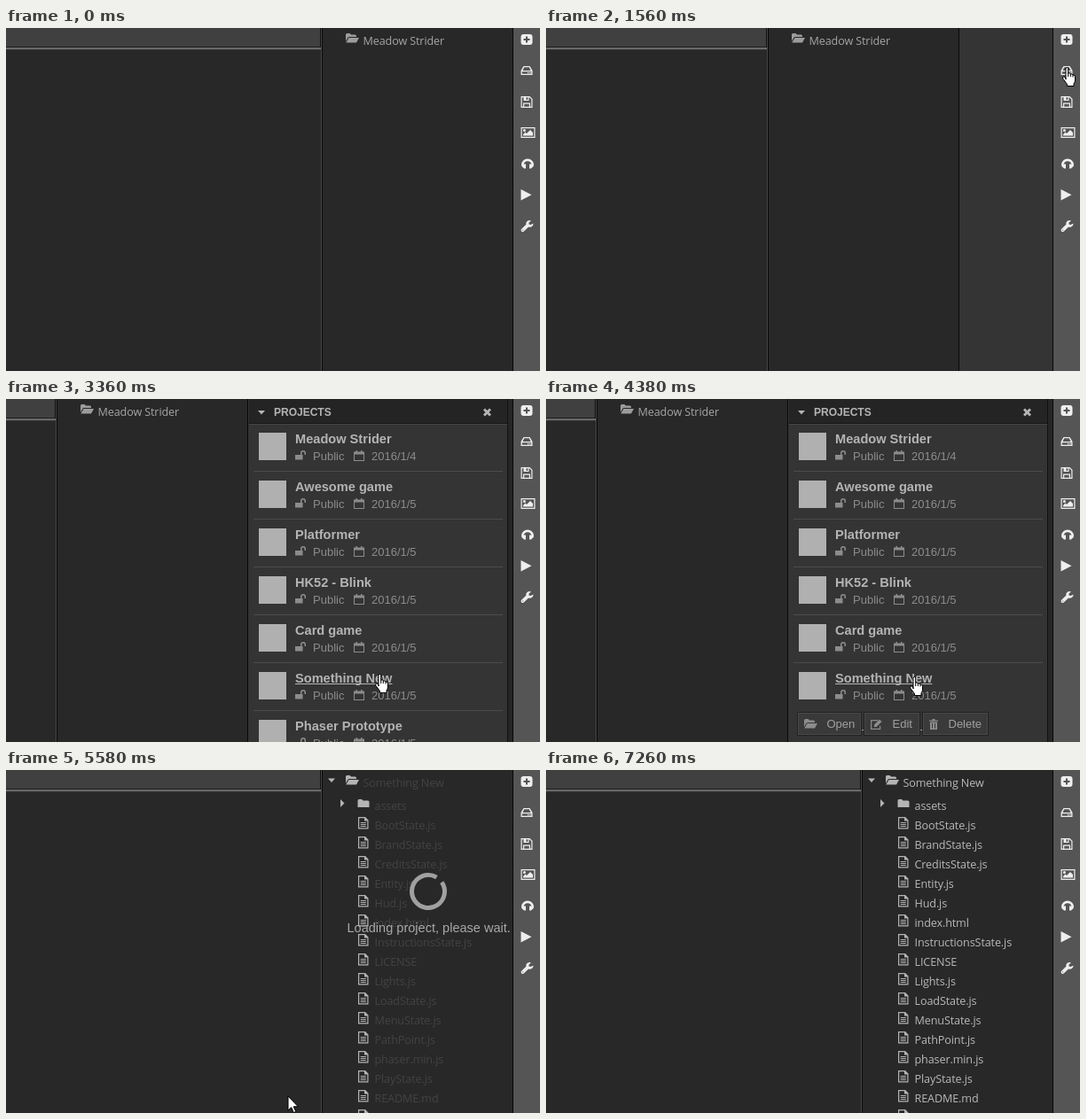
An HTML page with a canvas for the animation above (7800 ms loop, 602 px wide and 387 px high).

```html
<!DOCTYPE html>
<html lang="en">
<head>
<meta charset="utf-8">
<title>Project panel</title>
<style>
html, body { margin: 0; width: 100%; height: 100%; overflow: hidden; background: #282828; }
canvas { display: block; }
</style>
</head>
<body>
<canvas id="stage" width="602" height="387"></canvas>
<script>
const ctx = document.getElementById('stage').getContext('2d');
const W = 602, H = 387, LOOP = 7800, STEP = 60;
const SLIDE = 299, EDGE = 571, DRAWER = 40;
const ARIAL = '"Liberation Sans", Arial, sans-serif';
const TREE = '12.6px "Open Sans", "Noto Sans", sans-serif';
const TITLE = `bold 14.6px ${ARIAL}`, BODY = `13px ${ARIAL}`;

const projects = ['Meadow Strider', 'Awesome game', 'Platformer', 'HK52 - Blink',
  'Card game', 'Something New', 'Phaser Prototype'];
const files = ['BootState.js', 'BrandState.js', 'CreditsState.js', 'Entity.js', 'Hud.js',
  'index.html', 'InstructionsState.js', 'LICENSE', 'Lights.js', 'LoadState.js',
  'MenuState.js', 'PathPoint.js', 'phaser.min.js', 'PlayState.js', 'README.md', ''];

const shapes = {
  plus: 'M3 0H10Q13 0 13 3V9Q13 12 10 12H3Q0 12 0 9V3Q0 0 3 0ZM5.5 2.5V5H3V7H5.5V9.5H7.5V7H10V5H7.5V2.5Z',
  drive: 'M3 0H10L13 5V10H0V5ZM3.7 1.3L2 5H11L9.3 1.3ZM1.3 6.2V8.8H11.7V6.2ZM7.5 7H8.8V8.2H7.5ZM9.7 7H11V8.2H9.7Z',
  save: 'M0 0H10L13 3V13H0ZM1.2 1.2V11.8H2.5V7.5H10.5V11.8H11.8V3.5L9.5 1.2H9V5H3V1.2ZM3.7 8.7H9.3V11.8H3.7ZM6 1.2H7.8V4H6Z',
  image: 'M0 0H16V12H0ZM1.2 1.2V10.8H14.8V1.2ZM2.5 9.5V8L5 5.5L6.5 7L10.5 3L13.5 6V9.5ZM2.4 3.6a1.5 1.5 0 1 0 3 0a1.5 1.5 0 1 0-3 0Z',
  sound: 'M.5 7.5A7 7 0 0 1 14.5 7.5Q14.5 9.5 12.5 10.5L11.5 11.5H9.5V6.5H11.5L12 7A4.6 4.8 0 0 0 3 7L3.5 6.5H5.5V11.5H3.5L2.5 10.5Q.5 9.5 .5 7.5Z',
  play: 'M0 0L12 6.3L0 12.6Z',
  wrench: 'M14 3.5A4 4 0 0 1 8.5 7.5L3.3 12.5Q1.8 13.6 .6 12.4T.6 9.8L5.8 4.8A4 4 0 0 1 11.5 .4L9 2.5V4.5L11 5ZM1.6 10.6h1v1h-1Z',
  openFolder: 'M0 9V1.5Q0 0 1.5 0H4.5L6 1.5H10.5Q12 1.5 12 3V4H4Q3 4 2.3 5ZM3.5 5H15L12 10.5H.3Z',
  folder: 'M0 1.5Q0 0 1.5 0H4.5L6 1.5H11.5Q13 1.5 13 3V9H0Z',
  file: 'M0 0H8L11.5 3.5V13.5H0ZM1.2 1.2V12.3H10.3V4.5H7V1.2ZM2.7 6H8.8V7H2.7ZM2.7 8H8.8V9H2.7ZM2.7 10H8.8V11H2.7Z',
  unlock: 'M0 5H6V3Q6 0 9 0T12 3V5H10.5V3Q10.5 1.5 9 1.5T7.5 3V5H8.5V10.5H0Z',
  calendar: 'M0 1.5H12V12H0ZM1 4.5V11H11V4.5ZM2.5 0H4V1.5H2.5ZM8 0H9.5V1.5H8Z',
  edit: 'M0 1H8V2.2H1.2V10.8H10V8H11.2V12H0ZM4 9V6.5L10 .5L12.5 3L6.5 9Z',
  trash: 'M0 1.5H3.5V0H6.5V1.5H10V2.8H0ZM1 3.6H9V12H1ZM3 5V10.5H4V5ZM6 5V10.5H7V5Z',
  caretDown: 'M0 0H8L4 4.5Z',
  caretRight: 'M0 0L4.5 4.5L0 9Z',
  cross: 'M0 2L2 0L4.5 2.5L7 0L9 2L6.5 4.5L9 7L7 9L4.5 6.5L2 9L0 7L2.5 4.5Z',
  arrow: 'M0 0V16L3.7 12.7L6.3 18.5L8.8 17.5L6.2 11.8H11.3Z',
  hand: 'M4 14V2Q4 .5 5.3 .5T6.7 2V7Q9 6.3 9.3 8Q11.5 7.3 12 9Q14.3 8.6 14.5 11V15Q14.5 17 13 19V21.5H5.5V19.5L1 13.5Q0 11.5 1.5 11T4 13ZM6.7 7V11M9.3 8V11M12 9V11.5'
};
for (const key in shapes) shapes[key] = new Path2D(shapes[key]);

// Pointer stops: time, x, y
const stops = [[240, 309, 136], [1020, 557, 48], [1140, 586, 45], [1740, 586, 45],
  [1860, 525, 46], [1980, 510, 44], [2700, 460, 242], [3360, 420, 311], [4320, 420, 311],
  [4740, 318, 368], [5940, 318, 368], [6240, 549, 15], [6480, 238, 172],
  [6900, 238, 172], [7200, 590, 87], [7260, 590, 87]];

const clamp = v => Math.min(1, Math.max(0, v));
const swing = (t, start, length) => 0.5 - Math.cos(Math.PI * clamp((t - start) / length)) / 2;

function box(x, y, w, h, color) {
  ctx.fillStyle = color;
  ctx.fillRect(x, y, w, h);
}

function text(s, x, y, font, color, spacing = '0px') {
  ctx.font = font;
  ctx.letterSpacing = spacing;
  ctx.fillStyle = color;
  ctx.fillText(s, x, y);
}

function icon(name, x, y, color, outline) {
  ctx.save();
  ctx.translate(x, y);
  ctx.fillStyle = color;
  ctx.fill(shapes[name], 'evenodd');
  if (outline) {
    ctx.strokeStyle = outline;
    ctx.stroke(shapes[name]);
  }
  ctx.restore();
}

function clipped(x, y, w, h, draw) {
  ctx.save();
  ctx.beginPath();
  ctx.rect(x, y, w, h);
  ctx.clip();
  draw();
  ctx.restore();
}

function pointerAt(t) {
  const i = stops.findIndex(s => s[0] > t);
  if (i < 1) return null;
  const [t0, x0, y0] = stops[i - 1], [t1, x1, y1] = stops[i];
  const p = (t - t0) / (t1 - t0), k = p * p * (3 - 2 * p);
  return { x: Math.round(x0 + (x1 - x0) * k), y: Math.round(y0 + (y1 - y0) * k) };
}

function drawEditor(off) {
  box(0, 0, W, H, '#282828');
  box(0, 0, 354 - off, 21, '#404040');
  box(0, 21, 355 - off, 1, '#1c1c1c');
  box(0, 22, 355 - off, 2, '#696969');
  box(0, 24, 355 - off, 1, '#383838');
  box(354 - off, 0, 1, 22, '#101010');
  box(355 - off, 0, 1, H, '#484848');
  box(356 - off, 0, 1, H, '#080808');
}

function drawTree(t, off) {
  const loaded = t >= 5520, loading = t >= 5280 && t < 5940;
  const label = loading ? '#434343' : loaded ? '#b8b8b8' : '#a5a5a5';
  const tone = loaded ? '#b4b4b4' : '#9c9c9c';
  const name = (s, x, y) => text(s, x, y, TREE, label, '-0.12px');
  ctx.save();
  ctx.translate(-off, 0);
  icon('openFolder', 383, 6, tone);
  name(loaded ? projects[5] : projects[0], 402.5, 19);
  if (loaded) {
    icon('caretDown', 363, 9.5, tone);
    icon('caretRight', 377, 33, tone);
    icon('folder', 396.5, 33, tone);
    name('assets', 415.5, 45);
    files.forEach((f, i) => {
      icon('file', 397, 53 + 22 * i, tone);
      name(f, 415.5, 67 + 22 * i);
    });
  }
  if (loading) {
    const turn = (t - 5580) / 1000 * 2 * Math.PI;
    ctx.beginPath();
    ctx.arc(476, 137, 18.5, turn - 0.6, turn + 5.25);
    ctx.lineWidth = 5;
    ctx.strokeStyle = '#a0a0a0';
    ctx.stroke();
    ctx.lineWidth = 1;
    text('Loading project, please wait.', 384.5, 183, `14.55px ${ARIAL}`, '#a8a8a8');
  }
  ctx.restore();
}

function drawRow(i, y, active) {
  box(285, y + 11, 31, 31, '#b0b0b0');
  text(projects[i], 326, y + 23, TITLE, '#b4b4b4');
  if (active) box(326, y + 24, ctx.measureText(projects[i]).width, 1, '#b4b4b4');
  icon('unlock', 326, y + 31, '#8c8c8c');
  text('Public', 346, y + 42, BODY, '#8c8c8c');
  icon('calendar', 392, y + 31, '#8c8c8c');
  text(`2016/1/${i ? 5 : 4}`, 412, y + 42, BODY, '#8c8c8c');
  box(279, y + 54, 281, 1, '#4c4c4c');
}

function drawButton(glyph, label, x, w, textX, fill) {
  box(x, 353, w, 27, '#222');
  box(x + 1, 354, w - 2, 25, '#484848');
  box(x + 2, 355, w - 4, 23, fill);
  icon(glyph, x + 8, 361, '#8c8c8c');
  text(label, textX, 371, BODY, '#a0a0a0');
}

function drawProjects(t, pointer) {
  const drop = Math.round(DRAWER * swing(t, 3720, 300));
  const active = pointer && pointer.x < 560 ? Math.min(5, Math.floor((pointer.y - 27) / 54)) : -1;
  for (let i = 0; i < 6; i++) drawRow(i, 27 + 54 * i, i === active);
  if (drop) {
    box(279, 351, 281, 1, '#343434');
    clipped(274, 351, 291, drop, () => {
      const over = pointer.y > 351;
      drawButton('openFolder', 'Open', 283, 73, 316.5, t >= 5160 ? '#282828' : over ? '#303030' : '#3a3a3a');
      drawButton('edit', 'Edit', 358, 64, 390.5, '#3a3a3a');
      drawButton('trash', 'Delete', 424, 75, 453.5, '#3a3a3a');
      box(356, 373, 2, 1, '#a0a0a0');
      box(422, 373, 2, 1, '#a0a0a0');
    });
    box(279, 351 + drop, 281, 1, '#4c4c4c');
  }
  drawRow(6, 351 + drop, false);
  box(274, 0, 291, 27, '#242424');
  box(274, 27, 291, 1, '#161616');
  box(274, 28, 291, 1, '#454545');
  icon('caretDown', 284, 13, '#b4b4b4');
  text('PROJECTS', 302, 19, `bold 12px ${ARIAL}`, '#b4b4b4');
  icon('cross', 538, 10.5, '#b4b4b4');
  box(565, 0, 6, H, '#262626');
  box(565, 0, 1, H, '#101010');
}

function drawPanel(t, off, pointer) {
  if (!off) return;
  const left = EDGE - off;
  clipped(left, 0, off, H, () => {
    box(left, 0, off, H, '#343434');
    if (t >= 1740) {
      ctx.save();
      ctx.translate(SLIDE - off, 0);
      drawProjects(t, pointer);
      ctx.restore();
    }
    box(left, 0, 1, H, '#080808');
  });
}

function drawToolbar() {
  box(EDGE, 0, 1, H, '#080808');
  box(572, 0, 30, H, '#555');
  const tools = ['plus', 'drive', 'save', 'image', 'sound', 'play', 'wrench'];
  const tops = [7, 43, 77, 112, 147, 182, 217];
  tools.forEach((name, i) => icon(name, 580.5, tops[i], '#eee'));
}

function draw(t) {
  const off = Math.round(SLIDE * (swing(t, 1440, 296) - swing(t, 5220, 300)));
  const pointer = pointerAt(t);
  drawEditor(off);
  drawTree(t, off);
  drawPanel(t, off, pointer);
  drawToolbar();
  if (!pointer) return;
  if (pointer.x > EDGE - off) icon('hand', pointer.x - 4, pointer.y - 1, '#fff', '#000');
  else icon('arrow', pointer.x, pointer.y, '#fff', '#000');
}

function tick() {
  draw(Math.floor(performance.now() % LOOP / STEP) * STEP);
  requestAnimationFrame(tick);
}
tick();
</script>
</body>
</html>
```
